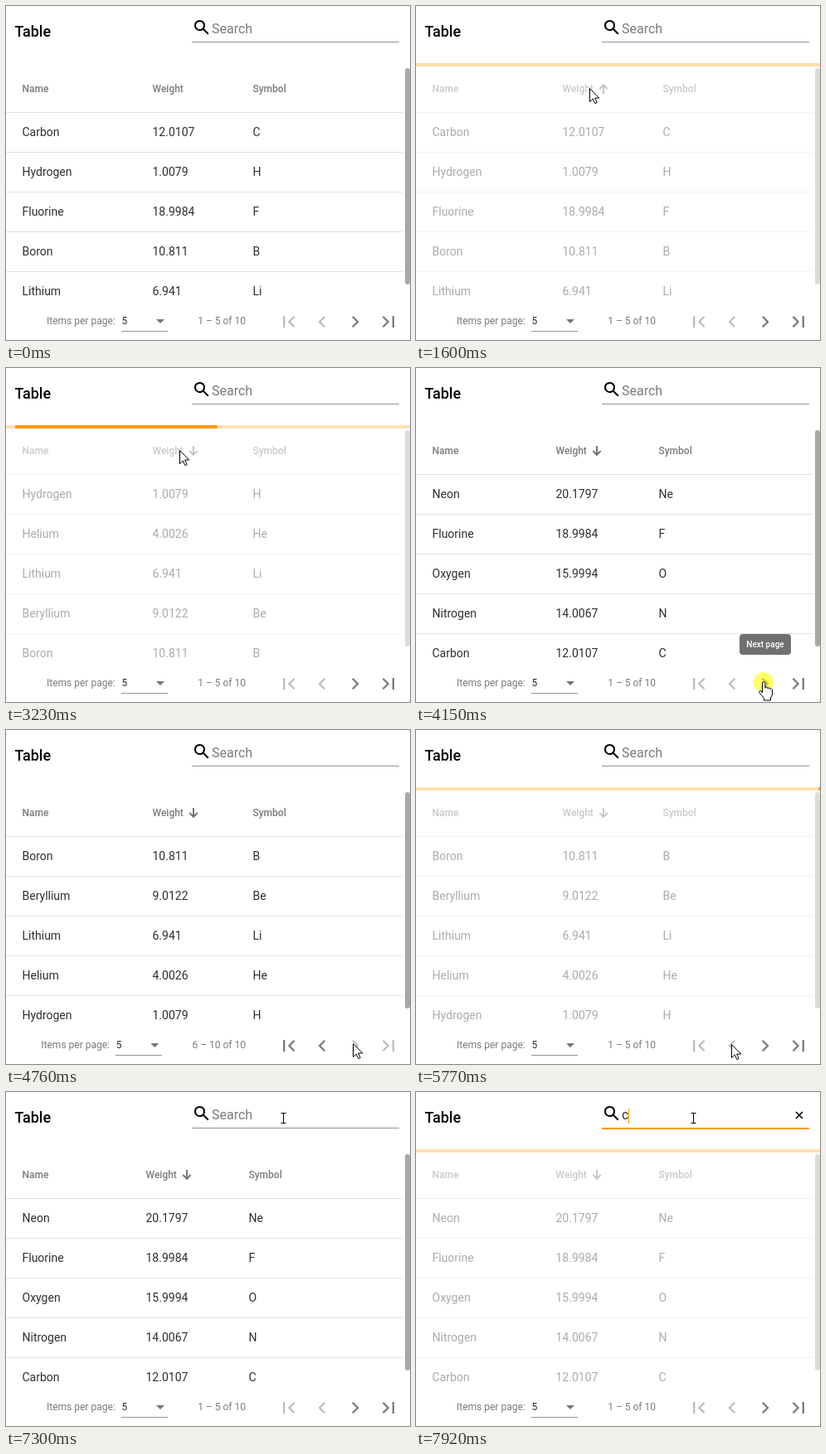
These frames come from a looping animation (487x403 px, 8000 ms). An HTML page with a canvas:

```html
<!DOCTYPE html>
<html lang="en">
<head>
<meta charset="utf-8">
<title>Sortable table</title>
<style>
  html, body { margin: 0; height: 100%; overflow: hidden; background: #fff; }
  canvas { display: block; width: 487px; height: 403px; }
</style>
</head>
<body>
<canvas></canvas>
<script>
const W = 487, H = 403, LOOP = 8000;
const canvas = document.querySelector('canvas');
const ctx = canvas.getContext('2d', { alpha: false });
const ratio = window.devicePixelRatio || 1;
canvas.width = W * ratio;
canvas.height = H * ratio;

const INK = 'rgba(0,0,0,.82)', MUTED = 'rgba(0,0,0,.52)', DISABLED = 'rgba(0,0,0,.26)';
const ORANGE = '#ff9800', PALE = '#ffe0b2', LINE = '#949494';

const ELEMENTS = {
  Hydrogen: ['1.0079', 'H'], Helium: ['4.0026', 'He'], Lithium: ['6.941', 'Li'],
  Beryllium: ['9.0122', 'Be'], Boron: ['10.811', 'B'], Carbon: ['12.0107', 'C'],
  Nitrogen: ['14.0067', 'N'], Oxygen: ['15.9994', 'O'], Fluorine: ['18.9984', 'F'],
  Neon: ['20.1797', 'Ne']
};
const ascending = Object.keys(ELEMENTS);
const descending = [...ascending].reverse();

// What the table shows after each finished load
const VIEWS = [
  ['Carbon', 'Hydrogen', 'Fluorine', 'Boron', 'Lithium'],
  ascending.slice(0, 5),
  descending.slice(0, 5),
  descending.slice(5),
  descending.slice(0, 5)
];

const HEADER = { x: 209, y: 99 };
const NEXT = { x: 418, y: 378, tip: 'Next page', tipX: 421, tipWidth: 62 };
const PREV = { x: 380, y: 379, tip: 'Previous page', tipX: 381, tipWidth: 78 };
const ASIDE = { x: 380, y: 355 };
const SEARCH = { x: 335, y: 31 };

const APPEAR = 450, HOVER = 1140, FOCUS = 7380, TYPED = 7690;
const MOVES = [
  { from: APPEAR, to: 1220, spot: HEADER },
  { from: 3300, to: 4000, spot: NEXT },
  { from: 4990, to: 5450, spot: PREV },
  { from: 6150, to: 6470, spot: ASIDE },
  { from: 6490, to: 7300, spot: SEARCH }
];
const CLICKS = [
  { at: 1440, spot: HEADER }, { at: 2690, spot: HEADER },
  { at: 4140, spot: NEXT }, { at: 5530, spot: PREV }, { at: FOCUS, spot: SEARCH }
];
const CLICK_TIME = 150, LOAD_TIME = 450;
const LOADS = [...CLICKS.slice(0, 4).map(click => click.at + CLICK_TIME), TYPED + CLICK_TIME];

const smooth = p => p * p * (3 - 2 * p);
const clamp = p => Math.min(1, Math.max(0, p));

function pointerAt(t) {
  let { x, y } = PREV;
  for (const { from, to, spot } of MOVES) {
    const p = smooth(clamp((t - from) / (to - from)));
    x += (spot.x - x) * p;
    y += (spot.y - y) * p;
  }
  return { x, y };
}

function stateAt(t) {
  const started = LOADS.filter(at => t >= at).length;
  const finished = LOADS.filter(at => t >= at + LOAD_TIME).length;
  const pointer = pointerAt(t);
  const goal = started < 4 && CLICKS[started].spot;
  const near = goal && Math.hypot(goal.x - pointer.x, goal.y - pointer.y) < 6;
  return {
    started, pointer,
    names: VIEWS[finished],
    loading: started > finished,
    elapsed: t - LOADS[started - 1],
    hovered: near && started === finished ? goal : null,
    clicking: CLICKS.some(({ at }) => t >= at && t < at + CLICK_TIME)
  };
}

function rect(x, y, w, h, color) {
  ctx.fillStyle = color;
  ctx.fillRect(x, y, w, h);
}

function pill(x, y, w, h, r, color) {
  ctx.fillStyle = color;
  ctx.beginPath();
  ctx.roundRect(x, y, w, h, r);
  ctx.fill();
}

function text(str, x, y, size, color, weight = 400, align = 'left') {
  ctx.font = `${weight} ${size}px Roboto, sans-serif`;
  ctx.fillStyle = color;
  ctx.textAlign = align;
  ctx.fillText(str, x, y);
}

// Fills and outlines a path placed at x, y; scaling may mirror it
function shape(d, x, y, { fill, stroke, width = 1, scaleX = 1, scaleY = 1 }) {
  const path = new Path2D(d);
  ctx.save();
  ctx.translate(x, y);
  ctx.scale(scaleX, scaleY);
  if (fill) {
    ctx.fillStyle = fill;
    ctx.fill(path);
  }
  if (stroke) {
    ctx.strokeStyle = stroke;
    ctx.lineWidth = width;
    ctx.stroke(path);
  }
  ctx.restore();
}

function drawSearch(t) {
  const focused = t >= FOCUS, typed = t >= TYPED;
  text('Table', 10.5, 37, 18, '#000', 500);
  shape('M5.5 0A5.5 5.5 0 1 1 5.5-.01M3.8 3.8L10.3 10.3', 233.5, 23.5, { stroke: '#000', width: 2 });
  rect(224, 43, 250, focused ? 2 : 1, focused ? ORANGE : LINE);
  if (typed) {
    text('c', 248, 33, 16, INK);
    shape('M-4-4L4 4M4-4L-4 4', 462, 28, { stroke: '#000', width: 1.6 });
  } else {
    text('Search', 248, 33, 16, MUTED);
  }
  if (focused) rect(typed ? 256 : 248, 20, 1, 18, ORANGE);
}

function drawTable(t, { names, started, loading, elapsed }) {
  const wide = names[0] !== 'Neon';
  const columns = [19.5, wide ? 176.5 : 168.5, wide ? 297.5 : 292.5];
  ['Name', 'Weight', 'Symbol'].forEach((label, i) => text(label, columns[i], 104, 12, MUTED, 500));
  if (t >= HOVER) {
    shape('M0 6V-5M-4.7 0L0-4.8 4.7 0', columns[1] + 49.5, 100,
      { stroke: t < CLICKS[0].at ? '#b5b5b5' : '#757575', width: 2, scaleY: started < 2 ? 1 : -1 });
  }
  names.forEach((name, row) => {
    const y = 128 + row * 48;
    rect(0, y, 478, 1, 'rgba(0,0,0,.12)');
    [name, ...ELEMENTS[name]].forEach((value, i) => text(value, columns[i], y + 29, 14, INK));
  });
  pill(481, 75, 6, 261, 3, '#a8a8a8');
  if (loading) {
    rect(0, 69, W, 290, 'rgba(255,255,255,.6)');
    rect(0, 69, W, 4, PALE);
    // A half-width bar slides in from the right
    rect((1 - (elapsed - 90) / 308) * W, 69, W / 2, 4, ORANGE);
  }
}

function drawPaginator({ started }) {
  const second = started === 3;
  const shift = second ? -6.7 : 0;
  text('Items per page:', 49 + shift, 384, 12, MUTED);
  text('5', 139.5 + shift, 384, 12, INK);
  rect(139 + Math.round(shift), 392, 56, 1, LINE);
  shape('M-5 0H5L0 5z', 186 + shift, 378, { fill: '#757575' });
  text(second ? '6 – 10 of 10' : '1 – 5 of 10', 289, 384, 12, MUTED, 400, 'right');
  for (let i = 0; i < 4; i++) {
    const jump = i % 3 === 0, back = i < 2;
    shape(jump ? 'M-6.6-6.2L-.4 0-6.6 6.2M5.8-7V7' : 'M-3.2-6.2L3 0-3.2 6.2', 341 + i * 40, 381,
      { stroke: back === second ? MUTED : DISABLED, width: 2.3, scaleX: back ? -1 : 1 });
  }
}

function drawTooltip({ tip, tipX, tipWidth }) {
  pill(tipX - tipWidth / 2, 321, tipWidth, 25, 4, '#707070');
  text(tip, tipX, 337, 10, '#fff', 500, 'center');
}

function drawPointer({ pointer: { x, y }, hovered, clicking }) {
  if (clicking) pill(x - 11, y - 11, 24, 24, 12, 'rgba(255,255,0,.6)');
  const style = { fill: '#fff', stroke: '#000' };
  if (y < 44) {
    shape('M-3-6H3M0-6V6M-3 6H3', Math.round(x) - .5, Math.round(y) + .5, { stroke: '#000' });
  } else if (hovered) {
    shape('M4.5 14V2.2a1.7 1.7 0 0 1 3.4 0V8.3a1.6 1.6 0 0 1 3.2.5a1.6 1.6 0 0 1 3 .6a1.5 1.5 0 0 1 2.4 1.2V16l-2 4v3H6.5V20.5L1 13.8a1.6 1.6 0 0 1 2.4-2z', x - 5, y, style);
  } else {
    shape('M.5.5V16.5L4.2 13 6.8 18.6 9.2 17.5 6.6 12H11.7Z', x, y, style);
  }
}

function draw(t) {
  const state = stateAt(t);
  ctx.setTransform(ratio, 0, 0, ratio, 0, 0);
  rect(0, 0, W, H, '#fff');
  drawSearch(t);
  drawTable(t, state);
  drawPaginator(state);
  if (state.hovered?.tip) drawTooltip(state.hovered);
  if (t >= APPEAR) drawPointer(state);
}

const start = performance.now();
function frame() {
  draw((performance.now() - start) % LOOP);
  requestAnimationFrame(frame);
}
frame();
</script>
</body>
</html>
```
